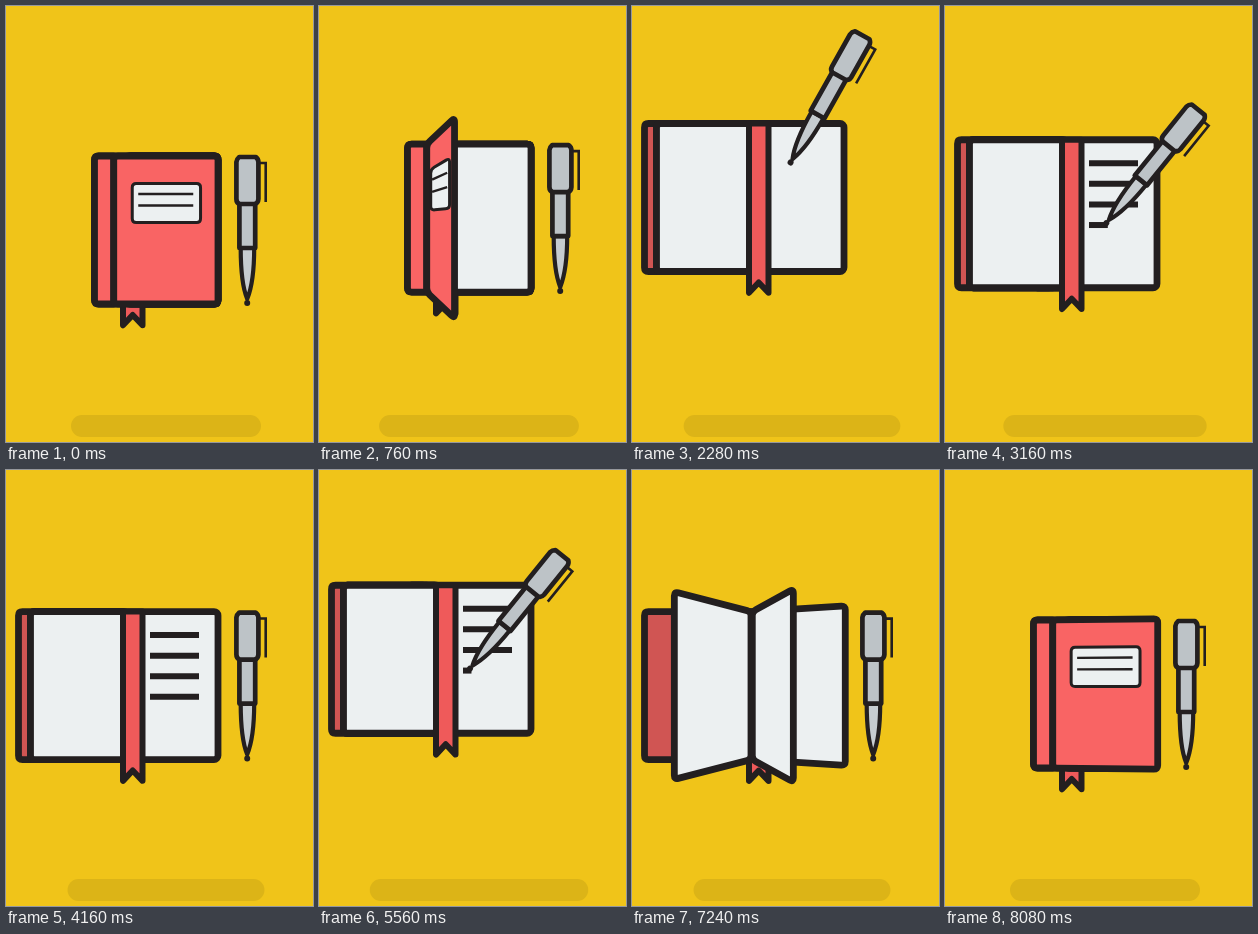
Animation of 307x436 px, one loop 8.12 s. Source, as an HTML page:

```html
<!DOCTYPE html>
<html lang="en">
<head>
<meta charset="utf-8">
<title>Notebook and pen</title>
<style>
  html, body { margin: 0; width: 100%; height: 100%; overflow: hidden; background: #f0c419; }
  svg { display: block; width: 100vw; height: 100vh; }
  .ink { stroke: #231f20; stroke-linejoin: round; }
  .board { stroke-width: 6.8; }
  .red { fill: #f96464; }
  .inside { fill: #d05553; }
  .paper { fill: #ecf0f1; }
  .metal { fill: #bdc3c7; stroke-width: 4.7; }
  .nib { fill: #c6ccd0; stroke-width: 4.2; }
  .none { fill: none; }
</style>
</head>
<body>
<svg viewBox="0 0 307 436">
  <rect id="shadow" y="409" height="22" rx="11" fill="#dcb417"/>
  <g id="scene">
    <rect class="ink board paper" x="88.5" y="150" width="123.5" height="148" rx="4"/>
    <g id="lines" class="ink none" stroke-width="6"></g>
    <path class="ink board red" d="M107.75 150V298H92.5Q88.5 298 88.5 294V154Q88.5 150 92.5 150Z"/>
    <g id="flat"></g>
    <path id="ribbon" class="ink" fill="#ef5a5a" stroke-width="6" d="M117 150H136.5V319.3L126.7 309L117 319.3Z"/>
    <g id="leaves"></g>
    <g id="pen" class="ink">
      <path class="none" stroke-width="2.6" stroke-linejoin="miter" d="M11 -140H18.5V-101"/>
      <path class="nib" d="M-6.5 -55C-6.5 -34 -4.5 -15 0 -4C4.5 -15 7 -34 7 -55Z"/>
      <path class="metal" d="M-7.8 -100H8V-55H-7.8Z"/>
      <path class="metal" d="M-8 -146H8.5Q11.2 -144 11.2 -141V-104Q11 -100 7.5 -99H-7.5Q-10.8 -100 -10.8 -104V-141Q-10.5 -144 -8 -146Z"/>
      <circle r="1.5" stroke-width="3"/>
    </g>
  </g>
</svg>
<script>
const LOOP = 8120, DEPTH = 365, EYE_X = 150, MID_Y = 224;
const TOP = 150, BOTTOM = 298, RIGHT = 212;
const $ = id => document.getElementById(id);
const clamp = v => Math.min(1, Math.max(0, v));
const lin = (t, a, b) => clamp((t - a) / (b - a));
const sine = p => (1 - Math.cos(Math.PI * p)) / 2;
const mix = (a, b, p) => a + (b - a) * p;

function make(tag, cls, parent) {
  const el = document.createElementNS('http://www.w3.org/2000/svg', tag);
  el.setAttribute('class', cls);
  parent.appendChild(el);
  return el;
}

function bezier(p, x1, y1, x2, y2) {
  const at = (a, b, u) => 3 * a * u * (1 - u) ** 2 + 3 * b * u * u * (1 - u) + u ** 3;
  let lo = 0, hi = 1;
  for (let i = 0; i < 24; i++) {
    const u = (lo + hi) / 2;
    if (at(x1, x2, u) < p) lo = u; else hi = u;
  }
  return at(y1, y2, lo);
}

// Floating height: start, end, from, to, easing
const floats = [
  [0, 1880, 0, 35, .42, 0, .58, 1],
  [1880, 3750, 35, 0, .42, 0, 1, 1],
  [3850, 5700, 0, 35, .2, .25, .58, 1],
  [5700, 7600, 35, 0, .42, 0, .85, .9]
];
function lift(t) {
  const f = floats.find(f => t < f[1]);
  return f ? mix(f[2], f[3], bezier(lin(t, f[0], f[1]), ...f.slice(4))) : 0;
}

// Turning leaves: point at distance u from the hinge, height y
function project(hinge, angle, u, y) {
  const s = DEPTH / (DEPTH - u * Math.sin(angle));
  const x = hinge + u * Math.cos(angle);
  return [EYE_X + (x - EYE_X) * s, MID_Y + (y - MID_Y) * s];
}

function roundQuad(pts, r) {
  const toward = (a, b) => {
    const d = Math.hypot(b[0] - a[0], b[1] - a[1]) || 1;
    const k = Math.min(r / d, .5);
    return [mix(a[0], b[0], k), mix(a[1], b[1], k)];
  };
  return pts.map((p, i) => {
    const a = toward(p, pts[(i + 3) % 4]), b = toward(p, pts[(i + 1) % 4]);
    return `${i ? 'L' : 'M'}${a}Q${p} ${b}`;
  }).join('') + 'Z';
}

function panel(hinge, angle, u0, u1, y0, y1) {
  return roundQuad([[u0, y0], [u1, y0], [u1, y1], [u0, y1]]
    .map(([u, y]) => project(hinge, angle, u, y)), 4);
}

// A leaf reaches from its hinge to the right edge, or to `left` when turned over
function leaf(hinge, left, angle) {
  const width = mix(RIGHT - hinge, hinge - left, angle / Math.PI);
  return panel(hinge, angle, 0, width, TOP, BOTTOM);
}

const turn = (t, [a, b, c, d]) => Math.PI * (sine(lin(t, a, b)) - sine(lin(t, c, d)));
const COVER_HINGE = 107.75;
const coverTimes = [300, 1360, 7570, 8130];
const pageTimes = [
  [921, 1721, 6980, 7680],
  [989, 1789, 6830, 7530],
  [1163, 1863, 6680, 7380]
];

const cover = make('g', '', $('leaves'));
const board = make('path', 'ink board', cover);
const label = make('g', 'ink', cover);
const tag = make('path', 'paper', label);
const rules = make('path', 'none', label);
tag.setAttribute('stroke-width', 3);
rules.setAttribute('stroke-width', 2.4);
const pages = pageTimes.map(() => make('path', 'ink board paper', $('leaves')));

function drawCover(angle) {
  const front = angle < Math.PI / 2;
  board.setAttribute('d', leaf(COVER_HINGE, 12.5, angle));
  board.setAttribute('class', 'ink board ' + (front ? 'red' : 'inside'));
  label.style.display = front ? '' : 'none';
  tag.setAttribute('d', panel(COVER_HINGE, angle, 18.5, 86.8, 177.5, 216.5));
  rules.setAttribute('d', [188, 199.5].map(y =>
    `M${project(COVER_HINGE, angle, 24.5, y)}L${project(COVER_HINGE, angle, 79.5, y)}`).join(''));
}

function drawBook(t) {
  const angle = turn(t, coverTimes);
  drawCover(angle);
  const leaves = [{ el: cover, angle }];
  pages.forEach((el, i) => {
    const a = turn(t, pageTimes[i]);
    el.setAttribute('d', leaf(119 + 1.3 * i, 24.5, a));
    leaves.push({ el, angle: a });
  });
  const left = leaves.filter(l => l.angle > Math.PI / 2);
  const right = leaves.filter(l => l.angle <= Math.PI / 2).reverse();
  for (const { el, angle } of [...left, ...right])
    (angle > 2.6 ? $('flat') : $('leaves')).appendChild(el);
}

// Writing
const X0 = 144, X1 = 193;
const writeAt = i => 2400 + 230 * i, WRITE = 185;
const wipeAt = i => 5470 + 137 * (3 - i), WIPE = 110;
const strokes = [0, 1, 2, 3].map(() => make('path', '', $('lines')));

const path = [];
const go = (t, x, y, r) => path.push([t, x, y, r]);
const rest = t => go(t, 241.2, 297, 0);
const onLine = (t, x, i) => go(t, x - 1.5, 168 + 21.8 * i, 35 + 1.3 * i);
rest(0);
rest(1950);
for (let i = 0; i < 4; i++) {
  onLine(writeAt(i), X0, i);
  onLine(writeAt(i) + WRITE, X1, i);
}
onLine(3330, X1, 3);
rest(3800);
rest(5040);
for (let i = 3; i >= 0; i--) {
  onLine(wipeAt(i), X1, i);
  onLine(wipeAt(i) + WIPE, X0, i);
}
onLine(6390, X0, 0);
rest(6780);
rest(LOOP);

function drawPen(t) {
  const i = Math.max(1, path.findIndex(k => k[0] > t));
  const a = path[i - 1], b = path[i];
  let p = lin(t, a[0], b[0]);
  if (!a[3] || !b[3]) p = sine(p);
  const [x, y, r] = [1, 2, 3].map(n => mix(a[n], b[n], p));
  $('pen').setAttribute('transform', `translate(${x} ${y}) rotate(${r})`);
}

function drawLines(t) {
  strokes.forEach((el, i) => {
    const p = lin(t, writeAt(i), writeAt(i) + WRITE) - lin(t, wipeAt(i), wipeAt(i) + WIPE);
    el.style.display = p > 0 ? '' : 'none';
    el.setAttribute('d', `M${X0} ${173.5 + 20.6 * i}H${mix(X0, X1, p)}`);
  });
}

function draw(t) {
  const h = lift(t), grow = h * .41;
  $('scene').setAttribute('transform', `translate(0 ${-h})`);
  $('shadow').setAttribute('x', 65 - grow);
  $('shadow').setAttribute('width', 190 + 2 * grow);
  drawBook(t);
  drawLines(t);
  drawPen(t);
}

const start = performance.now();
function tick() {
  draw((performance.now() - start) % LOOP);
  requestAnimationFrame(tick);
}
tick();
</script>
</body>
</html>
```
